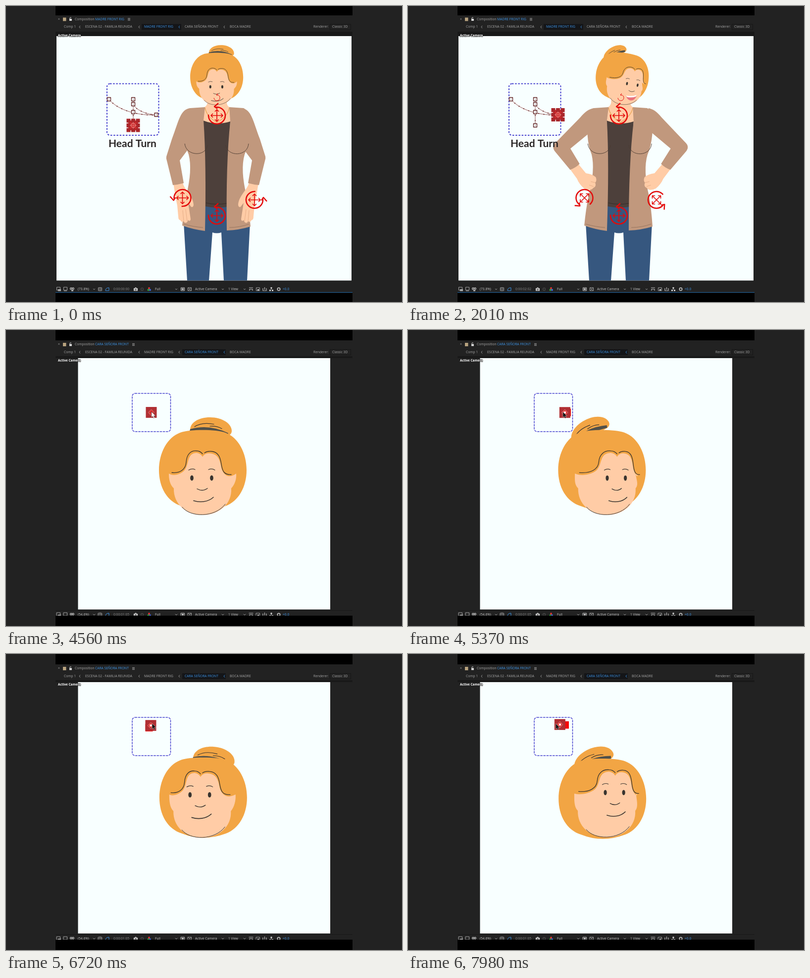
Animation of 800 by 600 pixels, one loop 8 s. Source, as an HTML page with a canvas:

```html
<!DOCTYPE html>
<html lang="es">
<head>
<meta charset="utf-8">
<style>
  html, body { margin: 0; width: 100%; height: 100%; overflow: hidden; background: #222; }
  canvas { display: block; width: 800px; height: 600px; }
</style>
</head>
<body>
<canvas id="stage" width="800" height="600"></canvas>
<script>
const ctx = document.getElementById('stage').getContext('2d');
const LOOP = 8000, CUT = 4200;
const HAIR = '#f2a544', SKIN = '#ffcca6', INK = '#39342f', JACKET = '#c1987d', JEANS = '#36577f',
      RED = '#e30a0a', PAPER = '#f8ffff', GREY = '#a6a6a6', BLUE = '#3d94e6';

// ---------- helpers ----------
const lerp = (a, b, p) => a + (b - a) * p;
const ease = (t, from, to) => {
  const p = Math.min(1, Math.max(0, (t - from) / (to - from)));
  return p * p * (3 - 2 * p);
};
const fill = (d, color) => { ctx.fillStyle = color; ctx.fill(new Path2D(d)); };
const stroke = (d, color = INK, width = 1) => {
  ctx.strokeStyle = color; ctx.lineWidth = width; ctx.stroke(new Path2D(d));
};
const rect = (x, y, w, h, color) => { ctx.fillStyle = color; ctx.fillRect(x, y, w, h); };
const dot = (x, y, rx, ry, color) => {
  ctx.beginPath(); ctx.ellipse(x, y, rx, ry, 0, 0, 7); ctx.fillStyle = color; ctx.fill();
};
const ring = (x, y, r, color, width = 1) => {
  ctx.beginPath(); ctx.arc(x, y, r, 0, 7); ctx.strokeStyle = color; ctx.lineWidth = width; ctx.stroke();
};
const text = (s, x, y, color = GREY, font = '6.7px "Open Sans", sans-serif') => {
  ctx.font = font; ctx.fillStyle = color; ctx.fillText(s, x, y);
};
const group = (draw) => { ctx.save(); draw(); ctx.restore(); };
const rotateAbout = (x, y, deg) => {
  ctx.translate(x, y); ctx.rotate(deg * Math.PI / 180); ctx.translate(-x, -y);
};
const warp = (d, move) => d.replace(/(-?[\d.]+),(-?[\d.]+)/g, (_, x, y) => move(+x, +y).join());
const morph = (a, b, p) => {
  const goal = b.match(/[\d.]+/g);
  let i = 0;
  return a.replace(/[\d.]+/g, n => lerp(+n, +goal[i++], p).toFixed(2));
};

// ---------- head: gx, gy is the look offset, drawn around (397,285) ----------
const FACE = 'M329,291 C338,297 352,293 360,285 C371,273 364,250 385,249 Q393,250 397,257 Q402,249 411,250 ' +
  'C435,251 432,275 437,285 C444,300 456,298 465,291 C466,303 462,313 455,321 C457,352 431,375 397,375 ' +
  'C363,375 338,352 339,321 C331,313 329,303 329,291Z';
const BANGS = 'M335,289 C352,291 363,282 364,268 C365,252 373,244 385,245 Q392,245 397,251 ' +
  'M401,249 Q407,245 415,246 C429,247 433,258 435,272 C437,285 440,294 455,293';

function head(gx, gy, { squint = 1, grin = false } = {}) {
  const up = Math.min(gy, 0);
  const side = x => (x - 397) / 68;
  const bangShift = (x, y) => [x + gx * (.9 - .6 * side(x) ** 2), y + gy * .45];
  const jawShift = (x, y) => [x + gx * .17, y + gy * .14];
  const faceShift = (x, y) => {
    if (y > 310) return jawShift(x, y);
    const d = side(x);
    if (Math.abs(d) < .9) return bangShift(x, y);
    return [x + gx * (d * gx > 0 ? -.18 : .29), y + gy * .35];
  };
  ctx.lineCap = ctx.lineJoin = 'round';

  group(() => {
    ctx.translate(0, -.55 * up);
    rotateAbout(397, 285, -.95 * (gx + .0065 * gx * gx));
    fill('M372,201 C373,187 390,177 412,177 C437,177 457,190 456,206 Q455,213 447,214 L380,214Z', HAIR);
    stroke('M381,196 C392,189 406,188 420,191 M412,195 Q426,194 436,200', INK, 1.2);
    fill('M372,201 Q410,190 449,209 L447,214 Q410,202 371,205Z', '#50504a');
  });
  group(() => {
    ctx.translate(-.2 * gx, -.4 * up);
    fill('M355,357 C325,348 309,318 309,284 C309,250 325,218 352,208 C370,201 425,201 443,208 ' +
      'C470,218 486,250 486,284 C486,318 470,347 443,357 Q397,374 355,357Z', HAIR);
  });
  fill(warp(FACE, faceShift), SKIN);
  stroke(warp(BANGS, bangShift), INK, 1.3);
  stroke(warp('M356,359 C372,380 422,381 443,353', jawShift), INK, 1);

  group(() => {
    ctx.translate(396 + gx * .9, gy * .83);
    ctx.scale(1 - Math.abs(gx) * .003, 1);
    ctx.translate(-396, 0);
    stroke('M369,284 Q376,280 382,283 M409,283 Q416,280 422,284', INK, 1.2);
    dot(375.5, 300, 3.4, 5.4 * squint, INK);
    dot(415.5, 300, 3.4, 5.4 * squint, INK);
    stroke('M386,322 Q397,328 407,321', INK, 1.4);
    if (grin) {
      fill('M379,341 Q399,344 418,335 Q413,354 396,354 Q384,352 379,341Z', '#e9737c');
      fill('M379,340 Q399,341 418,333 L415,339 Q399,346 382,344Z', '#fff');
    } else {
      stroke('M379,346 C392,350 408,349 419,339', INK, 1.6);
    }
  });
}

// ---------- body ----------
const SLEEVE_DOWN = 'M372,207 C352,210 350,230 335,270 L324,305 Q323,309 325,314 L337,363 Q348,362 359,359 L351,313 L372,285Z';
const SLEEVE_HIP = 'M372,207 C362,209 355,214 345,226 L297,276 Q287,285 295,295 L326,332 Q337,328 345,320 L326,289 L368,254Z';
const OPEN_HAND = 'M338,358 L357,358 C360,372 378,385 379,403 Q378,409 374,407 L368,399 L373,432 Q372,438 368,434 ' +
  'L366,438 Q361,442 359,436 Q355,440 352,434 Q348,434 348,426 L346,405 Q341,380 338,358Z';
const FIST = 'M326,331 L343,321 L358,339 Q372,341 378,347 Q381,354 377,358 Q380,366 373,369 Q368,376 355,370 Q345,362 340,350Z';

function arm(raise) {
  group(() => {
    const [cx, cy] = raise < .5 ? [348, 360] : [336, 326];
    ctx.translate(lerp(348, 336, raise) - cx, lerp(360, 326, raise) - cy);
    if (raise < .5) {
      fill(OPEN_HAND, SKIN);
      stroke('M359,436 L357,414 M366,436 L363,412', '#dfa780', .8);
    } else {
      fill(FIST, SKIN);
      stroke('M377,358 L368,356 M374,366 L365,363', '#dfa780', .8);
    }
  });
  fill(morph(SLEEVE_DOWN, SLEEVE_HIP, raise), JACKET);
}

function body(lean, raise) {
  fill('M359,440 L366,557 H410 L417,459 Q426,462 435,459 L440,557 H487 L493,440 L446,400 H403Z', JEANS);
  group(() => {
    ctx.transform(1, 0, -lean / 230, 1, lean * 450 / 230, 0);
    fill('M407,180 V196 Q406,203 399,206 L397,234 L426,242 L454,235 L453,206 Q446,203 446,196 V180Z', SKIN);
    stroke('M402,206 Q405,224 426,236 Q448,224 451,206', '#e3a04a', 1.2);
    fill('M398,232 Q426,243 453,234 L447,407 Q425,411 402,406Z', '#4d403b');
    stroke('M404,399 Q425,404 446,400', '#2e2724', .8);
    fill('M402,205 L372,207 Q357,213 360,260 Q362,285 369,301 Q377,332 364,385 Q359,410 356,445 Q378,453 402,456 ' +
      'Q405,320 399,232Z', JACKET);
    fill('M451,205 L480,207 Q493,213 491,260 Q489,285 482,301 Q473,332 486,385 Q491,410 494,447 Q472,454 446,455 ' +
      'Q444,320 453,234Z', JACKET);
    arm(raise);
    group(() => { ctx.translate(lerp(848, 854.5, raise), 0); ctx.scale(-1, 1); arm(raise); });
    stroke('M361,279 C364,305 404,306 407,282 M444,282 C447,306 488,306 490,279', '#4a3a30', .9);
    stroke('M359,442 Q380,448 398,449 M451,449 Q472,449 491,442', '#8d6b56', .8);
  });
}

// ---------- rig controls ----------
function rotator(x, y, deg) {
  group(() => {
    ctx.translate(x, y); ctx.rotate(deg * Math.PI / 180);
    ctx.lineCap = 'butt';
    ctx.beginPath(); ctx.arc(0, 0, 17, -1.7, 3.25);
    ctx.strokeStyle = RED; ctx.lineWidth = 2.5; ctx.stroke();
    stroke('M3,-25 L-5,-18 L1,-14', RED, 2.4);
    for (let i = 0; i < 4; i++) {
      stroke('M0,0 V-12 M-4,-8 L0,-12 L4,-8', RED, 1.7);
      ctx.rotate(Math.PI / 2);
    }
  });
}
function smallRotator(x, y) {
  ctx.beginPath(); ctx.arc(x, y, 6, -1.7, 3.1);
  ctx.strokeStyle = RED; ctx.lineWidth = 1; ctx.stroke();
  stroke(`M${x + 2},${y - 9} l-3,3 l2,2`, RED, 1);
}
function dashedBox(x, y, size, width) {
  group(() => {
    ctx.setLineDash([3.5, 2.7]);
    ctx.beginPath(); ctx.roundRect(x, y, size, size, 6);
    ctx.strokeStyle = '#4a45cf'; ctx.lineWidth = width; ctx.stroke();
  });
}
function keyframeTrail() {
  const trail = 'M208,189 C222,207 256,222 303,221 M257,199 C262,210 280,219 303,221 M257,189 V242';
  stroke(trail, '#8c4a48', .9);
  group(() => { ctx.setLineDash([1.6, 9]); stroke(trail, '#6a2020', 2); });
  for (const [x, y] of [[208, 189], [257, 189], [257, 199], [257, 215], [257, 242], [303.5, 220.5]]) {
    rect(x - 3.5, y - 3.5, 7, 7, PAPER);
    ctx.strokeStyle = '#5e1c1c'; ctx.lineWidth = 1.3; ctx.strokeRect(x - 3.5, y - 3.5, 7, 7);
    rect(x - .5, y - .5, 1.2, 1.2, '#5e1c1c');
  }
}
function gearHandle(x, y) {
  rect(x - 10, y - 10, 20, 20, '#cf2a2c');
  for (const dx of [-9.5, 0, 9.5]) for (const dy of [-9.5, 0, 9.5])
    if (dx || dy) rect(x + dx - 4, y + dy - 4, 8, 8, '#a9272b');
  ring(x, y, 4.5, '#f0a49c', 1);
  stroke(`M${x - 7},${y} h14 M${x},${y - 7} v14`, '#e98880', .8);
}

// ---------- editor frame ----------
const chevron = (x, y) => stroke(`M${x - 2},${y - 1} l2,2 l2,-2`, GREY, .9);
const iconBox = (x, y, color = GREY) => {
  ctx.strokeStyle = color; ctx.lineWidth = 1; ctx.strokeRect(x - 3.5, y - 3, 7, 6);
};

function header(y, active) {
  const tabs = [['Comp 1', 117, 149], ['ESCENA 02 - FAMILIA REUNIDA', 160, 269], ['MADRE FRONT RIG', 279, 350, 274, 80],
    ['CARA SEÑORA FRONT', 361, 441, 356, 88], ['BOCA MADRE', 452]];
  text('×', 105, y);
  rect(115, y - 3.5, 6.5, 7, '#b7a27e');
  rect(128, y - 1, 5, 4, '#ddd');
  stroke(`M129,${y - 1} v-2 q1.5,-2 3,0`, '#ddd', 1);
  text('Composition', 139, y);
  text(active, 180, y, BLUE);
  const menuX = active === 'MADRE FRONT RIG' ? 246 : 255;
  stroke(`M${menuX},${y - 2} h5 m-5,2 h5 m-5,2 h5`, GREY, .9);
  const row = y + 15.5;
  for (const [name, x, arrow, boxX, boxW] of tabs) {
    const on = name === active;
    if (on) rect(boxX, row - 6, boxW, 12, '#141518');
    text(name, x, row, on ? BLUE : GREY);
    if (arrow) stroke(`M${arrow + 1},${row - 2.5} l-2,2.5 l2,2.5`, on ? BLUE : GREY, .9);
  }
  text('Renderer:', 621, row);
  ctx.strokeStyle = '#171717'; ctx.lineWidth = 1; ctx.strokeRect(654.5, row - 5.5, 42, 11);
  text('Classic 3D', 659, row);
}

function footer(y, zoom, timecode) {
  iconBox(106, y - 1); rect(105, y, 6, 4, GREY);
  iconBox(120, y - 1); rect(117, y + 3, 6, 1, GREY);
  ring(131.5, y - 1, 1.8, '#ccc', 1.3); ring(135.5, y - 1, 1.8, '#ccc', 1.3); rect(132, y + 2, 4, 2, '#ccc');
  text(zoom, 145, y, '#c4c4c4');
  iconBox(190, y); stroke(`M190,${y - 4} v8 M186,${y} h8`, GREY, .7);
  stroke(`M201,${y + 3} q0,-6 7,-6 v6 z`, BLUE, 1);
  text(timecode, 217, y, '#8a8a8a');
  rect(258, y - 2, 8, 5.5, '#ccc'); rect(260.5, y - 3.5, 3, 2, '#ccc'); ring(262, y + .7, 1.4, '#333', .9);
  ring(275, y, 2.5, '#444', 1.5);
  dot(289, y - 2, 2, 2, '#d33'); dot(287.5, y + 1.5, 2, 2, '#3a3'); dot(291, y + 1.5, 2, 2, '#46d');
  text('Full', 301, y, '#c4c4c4');
  iconBox(357, y, '#ccc'); rect(355, y - 1.5, 4, 3, '#ccc');
  iconBox(371, y); stroke(`M368,${y - 3} l6,6 m0,-6 l-6,6`, GREY, .8);
  text('Active Camera', 382, y, '#c4c4c4');
  text('1 View', 449, y, '#c4c4c4');
  for (const x of [178, 344, 438, 482]) chevron(x, y);
  stroke(`M491,${y - 3} h8 M492,${y + 3} v-3 h6 v3`, '#bbb', 1.2);
  iconBox(509, y); rect(508, y, 3, 3, '#ccc');
  stroke(`M519,${y - 2} v5 h7 v-5 M522.5,${y - 4} v5`, '#bbb', 1.2);
  rect(534.5, y - 4, 3, 3, '#ccc'); rect(532, y + 1, 3, 3, '#ccc'); rect(537, y + 1, 3, 3, '#ccc');
  stroke(`M536,${y - 1} v2`, '#ccc', 1);
  ring(551, y, 2.7, '#ccc', 1.5);
  text('+0.0', 559, y, BLUE);
}

function cameraLabel(y) {
  ctx.font = 'bold 6.4px "Open Sans", sans-serif';
  ctx.strokeStyle = '#222'; ctx.lineWidth = 1.4; ctx.lineJoin = 'round';
  ctx.strokeText('Active Camera', 105, y);
  text('Active Camera', 105, y, '#fff', ctx.font);
}

// ---------- scenes ----------
function lookControl(t) {
  if (t < 1100) return [257, 242 - 53 * ease(t, 100, 750) + 10 * ease(t, 800, 1100)];
  const along = (p, a, b, c, d) => (1 - p) ** 3 * a + 3 * p * (1 - p) ** 2 * b + 3 * p * p * (1 - p) * c + p ** 3 * d;
  if (t < 2600) {
    const p = ease(t, 1100, 1750);
    return [along(p, 257, 262, 280, 303), along(p, 199, 210, 219, 220.5)];
  }
  const p = ease(t, 2600, 4190);
  return [along(p, 303, 256, 222, 208), along(p, 220.5, 222, 207, 189)];
}

function timecode(t) {
  const frame = Math.floor(t < 2010 ? t * 62 / 2010 + .01 : 62.01 + (t - 2010) * 58 / 1590);
  const pad = n => String(n).padStart(2, '0');
  return `0:00:${pad(Math.floor(frame / 30))}:${pad(frame % 30)}`;
}

function bodyScene(t) {
  rect(100, 0, 600, 19, '#000');
  rect(100, 52, 600, 9, '#191919');
  header(27, 'MADRE FRONT RIG');
  rect(102, 61, 596, 495.5, PAPER);
  cameraLabel(60.5);

  const [x, y] = lookControl(t);
  const gx = (x - 256) * .75, gy = (y - 215) * .75;
  const turn = (x - 256) / 47, raise = ease(t, 500, 1300);
  const tilt = turn > 0 ? 8.5 * turn : -1.5 * turn;

  group(() => {
    ctx.beginPath(); ctx.rect(102, 61, 596, 495.5); ctx.clip();
    body(turn > 0 ? 3 * turn : 0, raise);
  });
  group(() => {
    rotateAbout(427, 222, tilt);
    ctx.translate(425.5, 144.6);
    ctx.scale(.605, .605);
    ctx.translate(-397.5, -285);
    head(gx, gy, { squint: turn < -.3 ? .6 : 1, grin: turn > .5 });
  });
  dashedBox(204, 157.5, 104.5, 2);
  keyframeTrail();
  text('Head Turn', 207, 280, '#2b2626', 'bold 21px Lato, sans-serif');
  gearHandle(x, y);
  smallRotator(426 + Math.max(0, turn) * 4, 186);
  rotator(426, 222, 0);
  rotator(426, 425, 0);
  rotator(356.5, 389, -90 - 45 * raise);
  rotator(502, 393, 90 + 45 * raise);

  footer(574, '(73.8%)', timecode(t));
  rect(100, 580, 600, 1.2, '#1d5f9a');
  rect(100, 581.5, 600, 18.5, '#000');
}

// Drag of the look handle: time, x, y from the box centre.
const DRAG = [[4000, 0, 0], [4650, 0, 0], [4950, 18, -1], [5250, 30, 0], [5600, 2, 0], [5920, -28, -3], [6090, -31.5, -3],
  [6250, -30, -3], [6550, -10, -12], [6850, 4, -28], [7120, 8, -24], [7320, 2.5, 2], [7530, 8, 24], [7740, 28, 8],
  [7880, 27, -20], [7980, 13.5, -24], [8100, -8, -24], [8200, -20, -16]];

function drag(t) {
  const i = Math.max(1, DRAG.findIndex(k => k[0] > t) - 1);
  const [a, b, c, d] = [DRAG[i - 1], DRAG[i], DRAG[i + 1], DRAG[i + 2]];
  const p = Math.max(0, (t - b[0]) / (c[0] - b[0]));
  return [1, 2].map(n => b[n] + .5 * p * (c[n] - a[n] + p * (2 * a[n] - 5 * b[n] + 4 * c[n] - d[n]
    + p * (3 * (b[n] - c[n]) + d[n] - a[n]))));
}

function faceScene(t) {
  rect(100, 0, 600, 21, '#000');
  rect(100, 53, 600, 4, '#191919');
  header(29.5, 'CARA SEÑORA FRONT');
  rect(145.5, 57, 509.5, 509.5, PAPER);
  cameraLabel(62.5);

  const [gx, gy] = drag(t - 70), [hx, hy] = drag(t), [mx, my] = drag(t + 50);
  head(gx, gy);
  dashedBox(255, 128.5, 77.5, 1.5);
  rect(293.5 + gx - 7.5, 167 + gy - 7.5, 15, 15, '#f50808');
  const x = 293.5 + hx, y = 167 + hy;
  rect(x - 11, y - 11, 22, 22, '#b02f33');
  stroke(`M${x - 6},${y} l6,-6 l6,6 l-6,6 z`, '#e08b80', 1);
  ring(x, y, 3, '#f33', 1.5);
  const dragging = t > 4640;
  if (dragging) rect(x - 2, y - 2, 4, 4, '#fff');
  const cursor = `M${294 + mx},${166 + my} v11 l2.5,-2.3 l1.8,4 l2,-.9 l-1.8,-3.9 h3.4 z`;
  fill(cursor, dragging ? '#111' : '#fff');
  stroke(cursor, dragging ? '#ddd' : '#333', .5);

  rect(100, 568, 600, 1, '#171717');
  footer(577, '(54.6%)', '0:00:01:05');
  rect(100, 579, 600, 21, '#000');
}

function draw(now) {
  const t = now % LOOP;
  ctx.textBaseline = 'middle';
  rect(0, 0, 800, 600, '#222');
  group(() => t < CUT ? bodyScene(t) : faceScene(t));
  requestAnimationFrame(draw);
}
requestAnimationFrame(draw);
</script>
</body>
</html>
```
